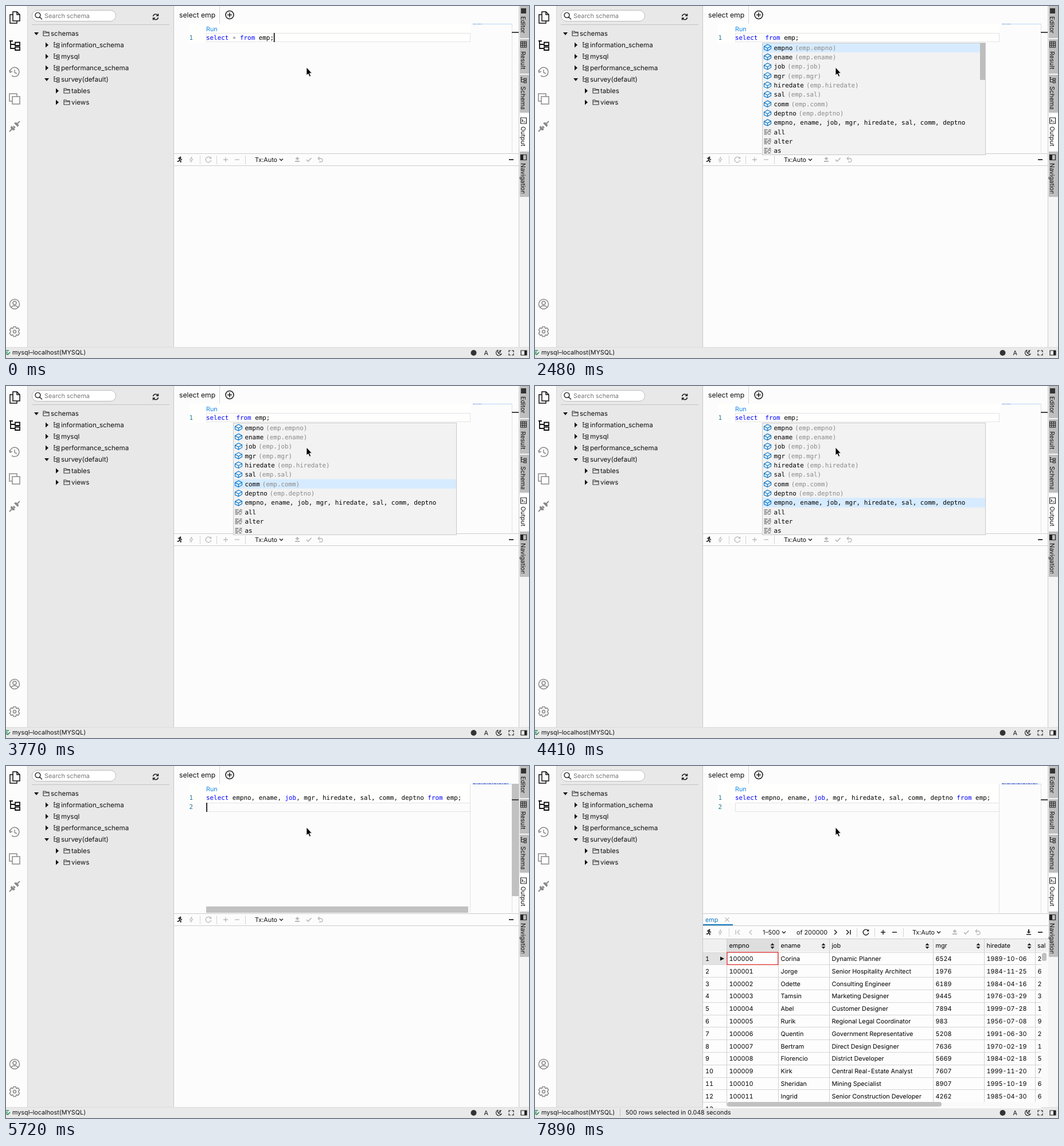
Write an HTML page that moves like this. It is 912 px wide and 614 px high and loops after 8 s.

```html
<!DOCTYPE html>
<html lang="en">
<head>
<meta charset="utf-8">
<title>Column completion</title>
<style>
html, body { margin: 0; width: 100%; height: 100%; overflow: hidden; background: #fcfcfc; }
svg { display: block; width: 912px; height: 614px; }
text { font: 10.8px Inter, sans-serif; fill: #111; white-space: pre; text-rendering: geometricPrecision; }
.tree text { font-size: 11.5px; }
.grid text { font-variant-numeric: tabular-nums; fill: #000; }
.code { font: 10.88px "DejaVu Sans Mono", monospace; fill: #000; }
.kw { fill: #00f; }
.dim { fill: #8a8a8a; }
</style>
</head>
<body>
<svg id="stage" viewBox="0 0 912 614" xmlns="http://www.w3.org/2000/svg"></svg>
<script>
const LOOP = 8000, CHAR = 6.55, CODE_X = 349, ROW = 16.36, LINE = 21.8;
const DARK = '#222', GREY = '#8a8a8a', PALE = '#b9b9b9', EDGE = '#d4d4d4';

const text = (x, y, s, attrs = '') => `<text x="${x}" y="${y}" ${attrs}>${s}</text>`;
const rect = (x, y, w, h, fill, attrs = '') =>
  `<rect x="${x}" y="${y}" width="${w}" height="${h}" fill="${fill}" ${attrs}/>`;
const icon = (d, x, y, color = DARK, width = 1.3, attrs = 'fill="none"') =>
  `<path d="${d}" transform="translate(${x} ${y})" stroke="${color}" stroke-width="${width}" ${attrs}/>`;
const solid = (d, x, y, color = DARK) => icon(d, x, y, 'none', 0, `fill="${color}"`);
const hline = (x, y, w, color = EDGE) => rect(x, y, w, 1, color);
const vline = (x, y, h, color = EDGE) => rect(x, y, 1, h, color);
const group = (id, body, attrs = '') => `<g id="${id}" ${attrs}>${body}</g>`;

const D = {
  refresh: 'M-4.5-1A4.6 4.6 0 0 1 4-2.5M4.5-5.5V-2H1M4.5 1A4.6 4.6 0 0 1-4 2.5M-4.5 5.5V2H-1',
  redo: 'M4.7 1A4.8 4.8 0 1 1 3.8-3M4.6-4.8V-2.2H2',
  plus: 'M-4 0H4M0-4V4',
  minus: 'M-4 0H4',
  chevron: 'M-3-1.5L0 1.5L3-1.5',
  right: 'M-2-4L2 0L-2 4',
  left: 'M2-4L-2 0L2 4',
  check: 'M-4 0L-1.2 3L4.5-3',
  undo: 'M-1-5L-4-2L-1 1M-4-2H1A3 3 0 0 1 1 4H-2',
  upload: 'M-4 4H4V2H-4ZM-1.2 1V-1H-4L0-5L4-1H1.2V1Z',
  download: 'M-4 4.5H4V3H-4ZM-1-5V-1H-3.5L0 2L3.5-1H1V-5Z',
  flash: 'M1-5L-3 1H0L-1 5L3-1H0Z',
  runner: 'M-3-2L0-3L1.5-1L4 0M0-3L-.5 1L2 2.5L1.5 5M-.5 1L-2 3H-4.5',
  schema: 'M-5-4.5H-2M-4-4.5V3.5H0M-4-1H0M.7-2.7H4.8V.3H.7ZM.7 2H4.8V5H.7Z',
  folder: 'M-5 4V-4H-1.5L0-2.5H5V4ZM-5-1H5',
  cube: 'M0-5.5L6-2.5V2L0 5.5L-6 3V-2ZM-6-2L0 1L6-2.5M0 1V5.5',
  keyword: 'M-6-4H0M2-4H6M-6-1.3H-2M0-1.3H6M-6 1.3H2M4 1.3H6M-6 4H-1M1 4H5'
};

const run = y => solid('M1-5.5a1.5 1.5 0 1 0 .1 0Z', 303, y) + icon(D.runner, 303, y, DARK, 1.6);
const txMenu = (x, y) => text(x, y + 4, 'Tx:Auto') + icon(D.chevron, x + 46, y, DARK, 1.4) +
  solid(D.upload, x + 74, y, PALE) + icon(D.check, x + 94, y, PALE, 1.8) + icon(D.undo, x + 114, y, PALE);

function activityBar() {
  const big = (d, y, c = GREY, w = 1.5) => icon(d, 15, y, c, w);
  return vline(37, 0, 595) +
    big('M-3-10H4L9-5V6H-3ZM4-10V-5H9M-3-5H-8V10H4V6', 20, '#111') +
    big('M-9-7H-3M-7-7V6H0M-7-1H0M1-4.5H9V1H1ZM1 3.5H9V9H1Z', 68, '#111', 1.8) +
    big('M-8 0A8 8 0 1 1-5 6.3M-9-3L-8 1L-4-1M0-4V1L4 3', 115) +
    big('M-4-4H9V9H-4ZM-4 4H-9V-9H4V-4', 162) +
    solid('M-1-5.5A4.6 4.6 0 0 1 5.5 1ZM-5.5-1A4.6 4.6 0 0 0 1 5.5Z', 15, 210, GREY) +
    big('M5-5L9-9M-5 5L-9 9M-2.5 1.5L-.5-.5M-1 3L1 1', 210, GREY, 2) +
    big('M-8.5 0A8.5 8.5 0 1 0 8.5 0A8.5 8.5 0 1 0-8.5 0M-3-2A3 3 0 1 0 3-2A3 3 0 1 0-3-2M-6 6C-4 1.5 4 1.5 6 6', 520) +
    big('M-2-8.5H2L3-5.5L6-6.5L8.5-3L6.5 0L8.5 3L6 6.5L3 5.5L2 8.5H-2L-3 5.5L-6 6.5L-8.5 3L-6.5 0L-8.5-3L-6-6.5L-3-5.5ZM-2.5 0A2.5 2.5 0 1 0 2.5 0A2.5 2.5 0 1 0-2.5 0', 568);
}

function sidebar() {
  const node = (x, y, label, open, d) =>
    solid(open ? 'M-4-2H4L0 3Z' : 'M-2-4.5V4.5L3 0Z', x, y, '#111') +
    icon(d, x + 17, y, '#333', 1.1) + text(x + 25, y + 4, label);
  const names = ['information_schema', 'mysql', 'performance_schema', 'survey(default)'];
  return rect(38, 0, 254, 595, '#e8e8e8') + vline(292, 0, 595, '#c8c8c8') +
    rect(45.5, 7.5, 146, 19, '#fff', 'rx="9.5" stroke="#bbb"') +
    icon('M4.5 0A4.5 4.5 0 1 1-4.5 0A4.5 4.5 0 1 1 4.5 0M3.2 3.2L7.5 7.5', 55.5, 16, '#444', 1.7) +
    text(67, 21, 'Search schema', 'style="fill:#777"') +
    icon(D.refresh, 261, 19, DARK, 1.5) + hline(45, 32, 240, '#c4c4c4') +
    group('tree', node(53, 48, 'schemas', true, D.folder) +
      names.map((n, i) => node(71, 68 + 20 * i, n, i === 3, D.schema)).join('') +
      ['tables', 'views'].map((n, i) => node(89, 148 + 20 * i, n, false, D.folder)).join(''), 'class="tree"');
}

function rightBar() {
  const tabs = [['Editor', 0, 56, 18], ['Result', 58, 60, 79], ['Schema', 120, 66, 140],
    ['Output', 188, 64, 210], ['Navigation', 254, 79, 274]];
  const marks = [
    rect(898, 4, 9, 9, '#333'),
    icon('M-5-5H5V5H-5ZM-5-2H5M-5 1.5H5M-1.7-5V5M1.7-5V5', 902.5, 67, DARK, 1.1),
    icon(D.schema, 902.5, 129, DARK, 1.1),
    icon('M-5-5H5V5H-5ZM-3-2L-1 0L-3 2M0 2H3', 902.5, 200, DARK, 1.2),
    icon('M-5-4.5H5V4.5H-5Z', 902.5, 264, DARK, 1.2) + rect(898, 260, 4, 8, DARK)
  ];
  return rect(895, 0, 17, 595, '#f5f5f5') + vline(894, 0, 595, '#ccc') +
    tabs.map(([name, y, h, ty], i) =>
      rect(896, y, 16, h, i === 3 ? '#fff' : '#bebebe') + marks[i] +
      `<svg x="895" y="${y}" width="17" height="${h - 6}">` +
      text(0, 0, name, `transform="translate(3 ${ty - y}) rotate(90)"`) + '</svg>').join('');
}

function statusBar() {
  return rect(0, 595, 912, 19, '#e9e9e9') + hline(0, 595, 912, '#dcdcdc') +
    icon('M-4-3H4M-4 0H2M-4 3H0M0 2L2 4L6 0', 1, 604, '#258a55', 1.6) +
    text(11, 608, 'mysql–localhost(MYSQL)') +
    '<circle cx="815.5" cy="605" r="5" fill="#333"/>' + text(833.5, 609, 'A') +
    icon('M-1-5A5 5 0 1 0 5 2A5 5 0 0 1-1-5M1-4H4L1-1H4', 859, 605, DARK, 1.2) +
    icon('M-4-1V-4H-1M1-4H4V-1M4 1V4H1M-1 4H-4V1', 881, 605, DARK, 1.2) +
    icon('M-5-4H5V4H-5Z', 903, 605, DARK, 1.2) + rect(904, 601, 4, 8, DARK);
}

function editor() {
  const dashes = 'fill="none" stroke-dasharray="5 1 2 1"';
  return text(302, 20, 'select emp', 'style="font-size:12.2px"') + vline(372, 0, 31) +
    icon('M7 0A7 7 0 1 1-7 0A7 7 0 1 1 7 0M-4 0H4M0-4V4', 390, 15.5, DARK, 1.6) +
    rect(319, 31, 491, 33, '#fffffe') +
    rect(349.5, 47.5, 460, 15, 'none', 'id="lineBox" stroke="#e2e2e2"') +
    text(349, 44, 'Run', 'style="fill:#1184e8"') +
    text(319.5, 59, '1', 'class="code" style="fill:#237893"') +
    group('second', text(319.5, 75, '2', 'class="code" style="fill:#237893"')) +
    '<text id="sql" class="code" x="349" y="59"></text>' +
    rect(814, 31, 68, 1, '#b9d8f5') +
    group('mapShort', icon('M0 0H16', 814, 31.5, '#7f9fe0', 1, dashes)) +
    group('mapLong', vline(809, 31, 225, '#e2e2e2') + icon('M0 0H62', 814, 31, '#7286d6', 2, dashes)) +
    vline(882, 31, 225, '#e0e0e0') +
    group('bars', rect(349, 245, 457, 11, '#c1c1c1') + '<rect id="thumb" x="882" y="31" width="13" fill="#c1c1c1"/>') +
    '<rect id="mark" x="882" width="13" height="2" fill="#444"/>' +
    '<rect id="caret" width="1.6" height="16" fill="#000"/>';
}

const blankPanel = () => hline(293, 257, 602, '#ccc') + hline(293, 278, 602, '#ccc') +
  group('runIcon', run(268)) + icon(D.flash, 323, 268, PALE, 1) + vline(338, 261, 15) +
  icon(D.redo, 353, 268, PALE, 1.3) + vline(367, 261, 15) +
  icon(D.plus, 383, 268, PALE) + icon(D.minus, 403, 268, PALE) +
  vline(417, 261, 15) + txMenu(434, 268) + icon(D.minus, 881, 268, DARK, 1.8);

const ROWS = `Corina|Dynamic Planner|6524|1989-10-06|2
Jorge|Senior Hospitality Architect|1976|1984-11-25|6
Odette|Consulting Engineer|6189|1984-04-16|2
Tamsin|Marketing Designer|9445|1976-03-29|3
Abel|Customer Designer|7894|1999-07-28|1
Rurik|Regional Legal Coordinator|983|1956-07-08|9
Quentin|Government Representative|5208|1991-06-30|2
Bertram|Direct Design Designer|7636|1970-02-19|1
Florencio|District Developer|5669|1984-02-18|5
Kirk|Central Real-Estate Analyst|7607|1999-11-20|7
Sheridan|Mining Specialist|8907|1995-10-19|6
Ingrid|Senior Construction Developer|4262|1985-04-30|6`.split('\n').map(r => r.split('|'));

function resultPanel() {
  const edges = [334, 424, 513, 694, 783, 872];
  const heads = ['empno', 'ename', 'job', 'mgr', 'hiredate', 'sal'];
  const bar = rect(293, 257, 602, 338, '#fcfcfc') + hline(293, 257, 602, '#ccc') + hline(293, 278, 602, '#ccc') +
    text(297, 272, 'emp', 'style="fill:#1177bb"') + icon('M-3.5-3.5L3.5 3.5M3.5-3.5L-3.5 3.5', 335, 268, PALE, 1.1) +
    rect(293, 276, 52, 2, '#1177bb') +
    run(290) + icon(D.flash, 323, 290, PALE, 1) + vline(338, 283, 15) +
    icon(D.left, 355, 290, PALE) + icon('M-5-4V4', 355, 290, PALE) + icon(D.left, 376, 290, PALE) +
    text(397, 294, '1–500') + icon(D.chevron, 434, 290, DARK, 1.4) + text(456, 294, 'of 200000') +
    icon(D.right, 524, 290, DARK, 1.5) + icon(D.right, 545, 290, DARK, 1.5) + icon('M5-4V4', 545, 290, DARK, 1.5) +
    vline(561, 283, 15) + icon(D.redo, 577, 290, DARK, 1.4) + vline(592, 283, 15) +
    icon(D.plus, 607, 290, DARK, 1.5) + icon(D.minus, 627, 290, DARK, 1.5) + vline(642, 283, 15) +
    txMenu(658, 290) + solid(D.download, 861, 290) + icon(D.minus, 881, 290, DARK, 1.8);

  let grid = rect(293, 301, 602, 23, '#f0f0f0') + rect(334, 301, 90, 23, '#dedede') +
    rect(293, 324, 590, 273, '#fdfdfd') + rect(293, 325, 41, LINE, '#e2e2e2');
  heads.forEach((h, i) => {
    grid += vline(edges[i], 301, 293, '#cfcfcf') + text(edges[i] + (i < 5 ? 4.5 : 4), 317, h);
    if (i < 5) grid += solid('M-3.5-1H3.5L0-5ZM-3.5 1H3.5L0 5Z', edges[i + 1] - 10, 314);
  });
  let cells = '';
  for (let r = 0; r < 13; r++) {
    const y = 340 + r * LINE;
    cells += hline(293, Math.round(324.6 + r * LINE), 590, '#d6d6d6') + text(297, y, r + 1);
    if (ROWS[r]) [100000 + r, ...ROWS[r]].forEach((v, c) => cells += text(edges[c] + 4.5, y, v));
  }
  return bar + `<svg class="grid" x="293" y="301" width="602" height="296" viewBox="293 301 602 296">${grid}` +
    `<svg x="293" y="324" width="590" height="273" viewBox="293 324 590 273">${cells}</svg>` +
    hline(293, 301, 602, '#ccc') +
    rect(335, 325, 88.8, 21.5, 'none', 'stroke="#e02020" stroke-width="1.2"') +
    solid('M-3-3.5V3.5L4 0Z', 326, 336, '#111') + rect(883, 324, 12, 271, '#fafafa') +
    rect(884, 326, 8, 14, '#c1c1c1', 'rx="3"') + rect(335, 586, 548, 9, '#fafafa') +
    rect(335, 586, 374, 8, '#c1c1c1', 'rx="4"') + '</svg>' + vline(148, 598, 13, '#bbb') +
    text(158, 608, '500 rows selected in 0.048 seconds', 'style="font-size:10.7px"');
}

const COLUMNS = ['empno', 'ename', 'job', 'mgr', 'hiredate', 'sal', 'comm', 'deptno'];
const ALL = COLUMNS.join(', ');

function popup() {
  const items = [...COLUMNS, ALL, 'all', 'alter', 'as'].map((w, i) => {
    const y = 72.5 + i * ROW;
    return (i < 9 ? icon(D.cube, 405.5, y, '#0b7bd0', 1.2) : icon(D.keyword, 405.5, y, '#555', 1.2)) +
      text(416.5, y + 4, w, 'class="code"') +
      (i < 8 ? text(420.5 + w.length * CHAR, y + 4, `(emp.${w})`, 'class="code dim"') : '');
  }).join('');
  return group('popup', '<svg x="396" y="64" width="390" height="196" viewBox="396 64 390 196">' +
    rect(396, 64, 390, 196, '#f2f2f2') +
    `<rect id="pick" x="396" width="390" height="${ROW}" fill="#d6ebff"/>` + items +
    '<rect id="popBar" x="776" y="64" width="9" height="65" fill="#bdbdbd"/>' +
    rect(396.5, 64.5, 389, 195, 'none', 'stroke="#c8c8c8"') + '</svg>');
}

const pointer = '<path d="M524 107V121L527 118.2L529.4 123.2L531.6 122.2L529.4 117.2H533.4Z" fill="#000" stroke="#fff" stroke-width=".8"/>';

const stage = document.getElementById('stage');
stage.innerHTML = rect(0, 0, 912, 614, '#fcfcfc') + activityBar() + sidebar() + editor() + blankPanel() +
  rightBar() + statusBar() + group('result', resultPanel()) + popup() + pointer;

const el = id => document.getElementById(id);
const PICKS = [[2300, 0], [2800, 1], [3060, 2], [3230, 3], [3410, 4], [3590, 5], [3770, 6], [4100, 7], [4250, 8]];
const CARET = [[0, 18], [180, 17], [350, 16], [530, 15], [700, 14], [870, 13], [1050, 11], [1220, 10],
  [1400, 8], [1520, 7], [1700, 8], [1970, 7], [4680, 58], [5430, 68], [5720, 0]];
const HIDDEN = [[2480, 2930], [3410, 3940], [4410, 4680], [5130, 5430], [6290, 6720], [7080, LOOP]];

const at = (keys, t) => keys.reduce((v, [time, next]) => t >= time ? next : v, keys[0][1]);
const show = (id, on) => el(id).setAttribute('visibility', on ? 'visible' : 'hidden');
const set = (id, name, value) => el(id).setAttribute(name, value);
const clamp = v => Math.max(0, Math.min(1, v));
// The asterisk sits lower, level with the lowercase letters.
const paint = s => s.replace(/\b(select|from|job)\b/g, '<tspan class="kw">$1</tspan>')
  .replace('* ', '<tspan dy="2" style="fill:#777">*</tspan><tspan dy="-2"> </tspan>');

let shown = '';
function draw(t) {
  const accepted = t >= 4680, entered = t >= 5720;
  const sql = `select ${accepted ? ALL : t < 1970 ? '*' : ''} from emp;`;
  if (sql !== shown) el('sql').innerHTML = paint(shown = sql);

  set('caret', 'x', CODE_X + at(CARET, t) * CHAR + (entered ? .3 : 0));
  set('caret', 'y', entered ? 64 : 47);
  show('caret', !HIDDEN.some(([a, b]) => t >= a && t < b));
  set('lineBox', 'transform', `translate(0 ${entered ? 17 : 0})`);
  show('second', entered);

  show('mapShort', t < 4770);
  show('mapLong', t >= 4770);
  set('mark', 'y', entered ? 58 : 45);
  set('thumb', 'height', entered ? 196 : 210);
  set('bars', 'opacity', accepted ? clamp(1 - (t - (entered ? 6290 : 5130)) / 790) : 0);

  show('popup', t >= 2300 && !accepted);
  set('pick', 'y', 64.4 + at(PICKS, t) * ROW);
  set('popBar', 'opacity', clamp((3700 - t) / 470));

  set('runIcon', 'opacity', t >= 6560 ? .35 : 1);
  show('result', t >= 7890);
}

function tick(now) {
  draw(now % LOOP);
  requestAnimationFrame(tick);
}
draw(0);
requestAnimationFrame(tick);
</script>
</body>
</html>
```
